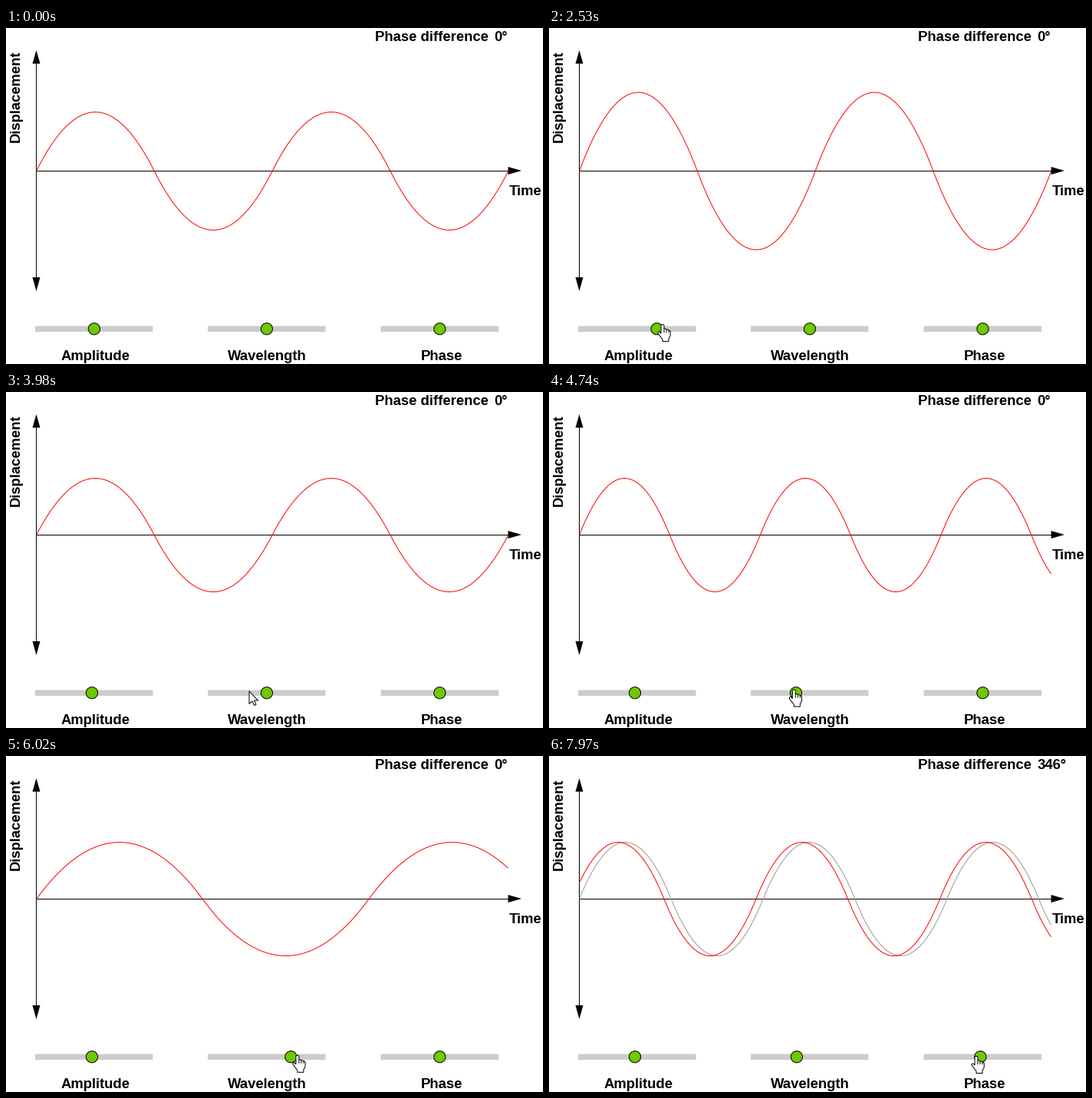
These frames come from a looping animation (700x438 px, 7990 ms). A matplotlib script:

```python
import numpy as np
import matplotlib.pyplot as plt
from matplotlib.animation import FuncAnimation
from matplotlib.patches import Circle, Polygon, Rectangle

W, H, DPI = 700, 438, 64
PX = 72 / DPI                      # points per pixel
STEP, FRAMES = 17, 470             # ms per frame, frames per loop
X0, X1, Y0 = 39.5, 654.5, 186.5    # wave extent and axis height
TRACKS, TRACK_LEN, KNOB_Y = (38, 263, 488.5), 153.8, 392.2
MID = TRACK_LEN / 2
LAG = 45                           # knob follows the pointer by this many ms
ENTER, ARRIVE = 300, 860
DRAGS = ((1050, 3650), (4540, 6720), (7840, 7956))

# pointer stops: arrival time, rest, x
STOPS = ((ENTER, 0, 91), (ARRIVE, 190, 117), (1860, 0, 70), (2516, 150, 148),
         (2950, 200, 170), (3590, 60, 114.1), (3978, 100, 317),
         (4390, 150, 343), (5050, 0, 278), (5219, 120, 298), (6110, 80, 391),
         (6650, 70, 326), (6970, 30, 474), (7540, 300, 562), (7956, 0, 557))
LEGS = np.array([(t + wait, x) for t, rest, x in STOPS for wait in (0, rest)])

ARROW = np.array([(0, 0), (0, 16.5), (4, 13), (6.5, 18.5), (9, 17.5),
                  (6.5, 12), (11.5, 12)])
HAND = np.array([(-1, 0.5), (1, 0.5), (2, 1.5), (2, 6), (4, 6), (5, 7),
                 (7, 7), (8, 8), (9, 8), (10.2, 9.5), (10.2, 15), (8, 19),
                 (8, 22.5), (0, 22.5), (0, 20), (-6, 12), (-6, 10.5),
                 (-4, 9.8), (-2, 12), (-2, 1.5)])
FINGERS = np.array([(2 + 3 * k, y) for k in range(3)
                    for y in (6 + k, 11, np.nan)])


def pointer_x(t):
    return np.interp(t, *LEGS.T)


def pointer_y(t):
    """Slow drift with a sway, after rising from below the stage."""
    drift = 386.5 + (t - 2000) * 9e-4
    sway = 2.4 * np.cos(2 * np.pi * (t - 1900) / 3350)
    return drift - sway + np.interp(t, (ENTER, ARRIVE), (56, 0))


def knob(t, press, release):
    """Distance of a knob from the left end of its track."""
    return MID + pointer_x(np.clip(t, press, release) - LAG) - pointer_x(press)


def wave(amp, length, phase=0):
    """Chain of alternating parabolic arcs."""
    u = 2 * (xs - X0) / length - phase / 180
    n = np.floor(u)
    f = u - n
    return Y0 - amp * 4 * f * (1 - f) * (1 - 2 * (n % 2))


fig = plt.figure(figsize=(W / DPI, H / DPI), dpi=DPI, facecolor="white")
ax = fig.add_axes([0, 0, 1, 1])
ax.set_xlim(0, W)
ax.set_ylim(H, 0)
ax.axis("off")


def label(x, y, text, **kw):
    return ax.text(x, y, text, family="Liberation Sans", weight="bold",
                   size=18.5 * PX, va="baseline", ha="left", **kw)


def line(x, y, color, z):
    return ax.plot(x, y, color=color, lw=PX, zorder=z, snap=False,
                   solid_capstyle="butt")[0]


def shape(points, **kw):
    return ax.add_patch(Polygon(points, closed=True, snap=False, **kw))


label(481, 17, "Phase difference")
label(655.8, 218.5, "Time")
label(18, 148.6, "Displacement", rotation=90, rotation_mode="anchor")
label(71.5, 433, "Amplitude")
label(288.7, 433, "Wavelength")
label(541, 433, "Phase")
angle = label(636.3, 17, "0°")

line([X0, X0], [40, 332], "black", 3)
line([X0, 660], [Y0, Y0], "black", 3)
for head in ([(X0, 29), (X0 - 5, 46.5), (X0 + 5, 46.5)],
             [(X0, 343), (X0 - 5, 325), (X0 + 5, 325)],
             [(672, 186), (654.5, 181), (654.5, 191)]):
    shape(head, fc="black", lw=0, zorder=3)

knobs = []
for left in TRACKS:
    ax.add_patch(Rectangle((left, 388.5), TRACK_LEN - 0.3, 7.5, fc="#cccccc",
                           lw=0, snap=False))
    knobs.append(ax.add_patch(Circle((left + MID, KNOB_Y), 7.6, fc="#70c800",
                                     ec="black", lw=PX, zorder=5)))

xs = np.linspace(X0, X1, 1231)
still = line(xs, wave(MID, 4 * MID), "#999999", 3.5)
curve = line(xs, wave(MID, 4 * MID), "red", 4)

style = dict(fc="white", ec="black", lw=PX, zorder=7, joinstyle="round")
arrow, hand = shape(ARROW, **style), shape(HAND, **style)
fingers = line(FINGERS[:, 0], FINGERS[:, 1], "black", 8)


def draw(i):
    t = i * STEP
    offsets = [knob(t, *drag) for drag in DRAGS]
    for k, left, d in zip(knobs, TRACKS, offsets):
        k.center = (left + d, KNOB_Y)

    amp, quarter, turn = offsets
    phase = round((turn - MID) * 720 / TRACK_LEN)
    curve.set_ydata(wave(amp, 4 * quarter, phase))
    still.set_ydata(wave(amp, 4 * quarter))
    still.set_visible(phase != 0)
    angle.set_text(f"{phase % 360}°")

    tip = np.array([pointer_x(t), pointer_y(t)])
    over = any(np.hypot(*(tip - k.center)) < 8 for k in knobs)
    grab = over or any(a <= t <= b for a, b in DRAGS)
    shown = t >= ENTER
    arrow.set_visible(shown and not grab)
    hand.set_visible(shown and grab)
    fingers.set_visible(shown and grab)
    arrow.set_xy(ARROW + tip)
    hand.set_xy(HAND + tip)
    fingers.set_data(*(FINGERS + tip).T)
    return curve, still, angle, arrow, hand, fingers, *knobs


anim = FuncAnimation(fig, draw, frames=FRAMES, interval=STEP,
                     repeat=True, repeat_delay=0, blit=False)
plt.show()
```
